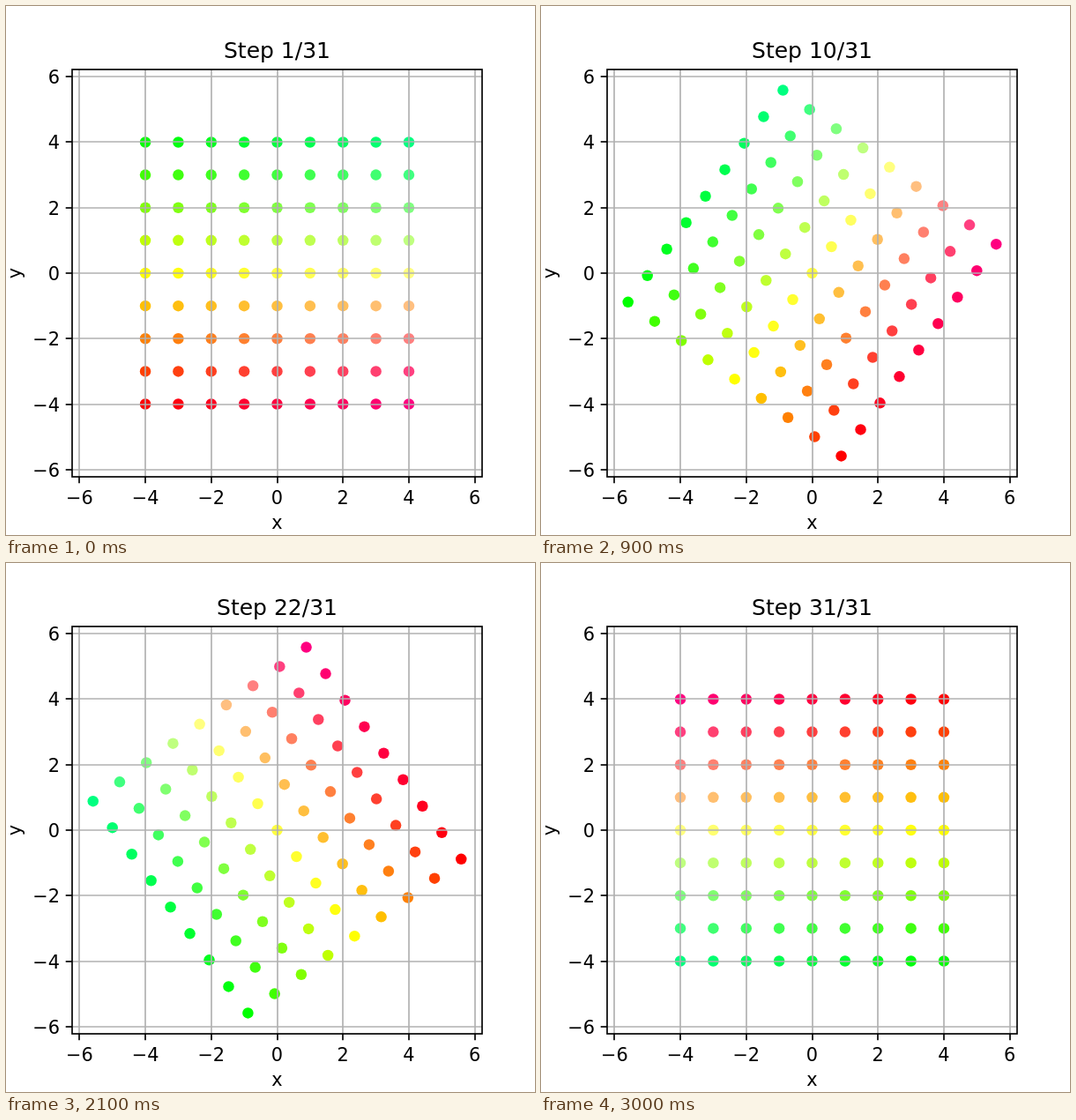
Recreate the animation shown at these times as an HTML page with a canvas. Size 600 by 600 pixels, loop 3.1 s.

```html
<!DOCTYPE html>
<html lang="en">
<head>
<meta charset="utf-8">
<title>Rotating grid</title>
<style>
  html, body { margin: 0; width: 100%; height: 100%; overflow: hidden; background: #fff; }
  canvas { display: block; }
</style>
</head>
<body>
<canvas id="plot" width="600" height="600"></canvas>
<script>
const ctx = document.getElementById('plot').getContext('2d');
const STEPS = 31, STEP_MS = 100;
const LEFT = 75, RIGHT = 540, TOP = 72, BOTTOM = 534;
const LIMIT = 6.222, DOT_RADIUS = 6.25, LINE_WIDTH = 1.667, TICK = 7.3;
const TICKS = [-6, -4, -2, 0, 2, 4, 6];

const toX = x => (LEFT + RIGHT) / 2 + x * (RIGHT - LEFT) / (2 * LIMIT);
const toY = y => (TOP + BOTTOM) / 2 - y * (BOTTOM - TOP) / (2 * LIMIT);

function line(x1, y1, x2, y2, color) {
  ctx.strokeStyle = color;
  ctx.beginPath();
  ctx.moveTo(x1, y1);
  ctx.lineTo(x2, y2);
  ctx.stroke();
}

function text(str, x, y, align = 'center', size = 20.83) {
  ctx.font = `${size}px "DejaVu Sans", sans-serif`;
  ctx.textAlign = align;
  ctx.fillStyle = '#000';
  ctx.fillText(str, x, y);
}

function drawDots(angle) {
  const c = Math.cos(angle), s = Math.sin(angle);
  for (let x = -4; x <= 4; x++) {
    for (let y = -4; y <= 4; y++) {
      const rgb = [Math.min(1, (4 - y) / 4), Math.min(1, (y + 4) / 4), (x + 4) / 16];
      ctx.fillStyle = `rgb(${rgb.map(v => Math.round(v * 255))})`;
      ctx.beginPath();
      ctx.arc(toX(x * c - y * s), toY(x * s + y * c), DOT_RADIUS, 0, 2 * Math.PI);
      ctx.fill();
    }
  }
}

function drawAxes() {
  ctx.lineWidth = LINE_WIDTH;
  for (const v of TICKS) {
    const x = Math.round(toX(v)), y = Math.round(toY(v));
    line(x, TOP, x, BOTTOM, '#b0b0b0');
    line(LEFT, y, RIGHT, y, '#b0b0b0');
  }
  for (const v of TICKS) {
    const x = Math.round(toX(v)), y = Math.round(toY(v));
    const label = String(v).replace('-', '\u2212');
    line(x, BOTTOM, x, BOTTOM + TICK, '#000');
    line(LEFT - TICK, y, LEFT, y, '#000');
    text(label, toX(v), 565);
    text(label, 61, y + 8, 'right');
  }
  ctx.strokeRect(LEFT, TOP, RIGHT - LEFT, BOTTOM - TOP);
  text('x', toX(0), 593);
  ctx.save();
  ctx.translate(17, toY(0));
  ctx.rotate(-Math.PI / 2);
  text('y', 0, 0);
  ctx.restore();
}

function draw() {
  const step = Math.floor(performance.now() / STEP_MS) % STEPS;
  ctx.fillStyle = '#fff';
  ctx.fillRect(0, 0, 600, 600);
  drawDots(step * Math.PI / (STEPS - 1));
  drawAxes();
  text(`Step ${step + 1}/${STEPS}`, toX(0), 59, 'center', 25);
  requestAnimationFrame(draw);
}
draw();
</script>
</body>
</html>
```
